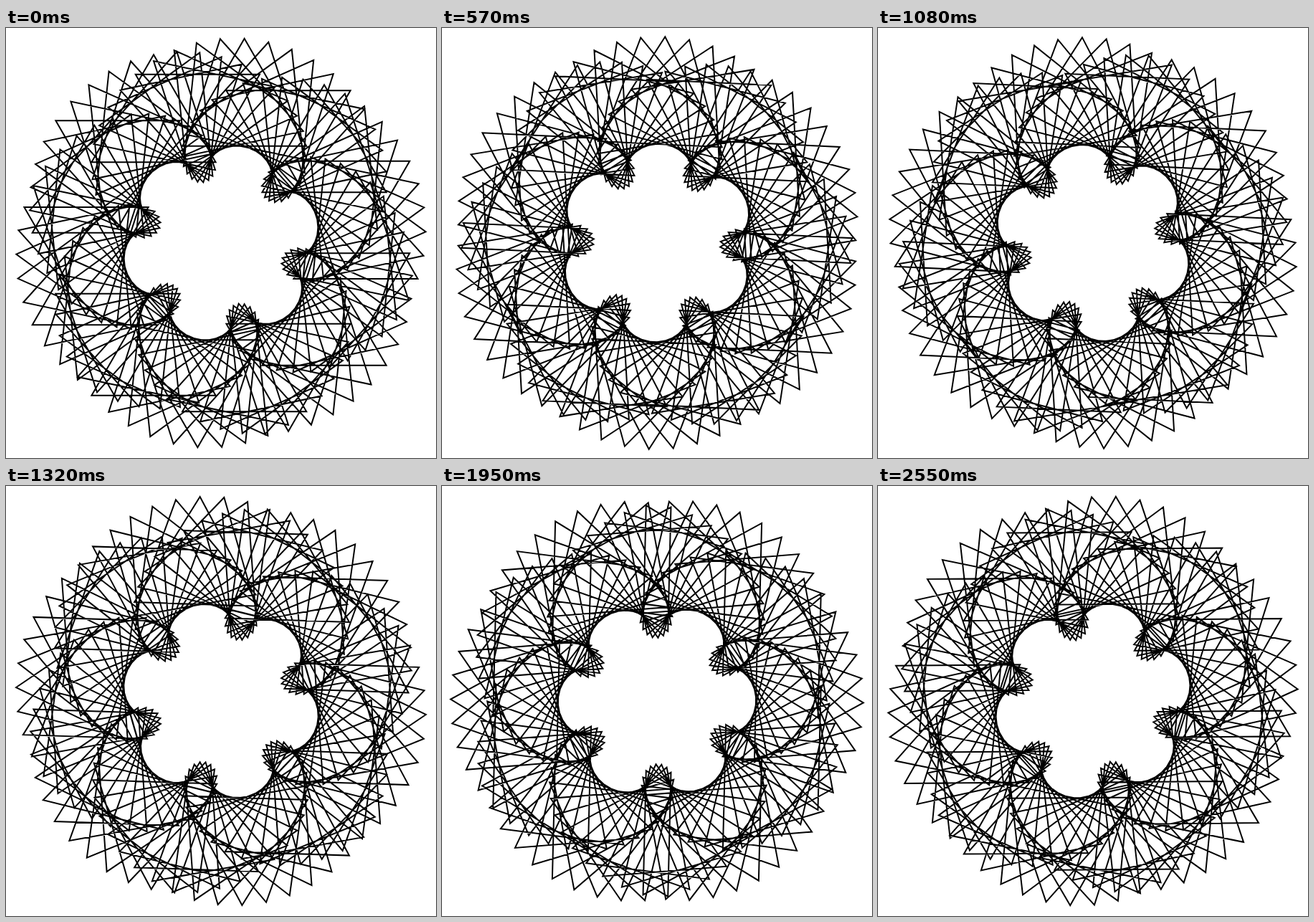
An HTML page that plays this animation: 600x600 px, repeating every 2.58 s.

```html
<!DOCTYPE html>
<html lang="en">
<head>
<meta charset="utf-8">
<title>Turning triangles</title>
<style>
  html, body { margin: 0; width: 100%; height: 100%; overflow: hidden; background: #fff; }
  svg { display: block; width: 100vw; height: 100vh; }
  path { fill: none; stroke: #000; stroke-width: 2; stroke-linejoin: miter; }
</style>
</head>
<body>
<svg viewBox="0 0 600 600"><path id="rosette"/></svg>
<script>
const COUNT = 90;             // triangles on the ring
const RING = 188;             // distance of their centres from the middle
const RADIUS = 100;           // centre to corner
const STEP = 30, LOOP = 2580; // ms
const START = Math.PI / 6;
const TURN = Math.PI / 128;   // rotation per step
const rosette = document.getElementById('rosette');

function corner(cx, cy, angle) {
  const x = cx + RADIUS * Math.cos(angle);
  const y = cy + RADIUS * Math.sin(angle);
  return x.toFixed(2) + ' ' + y.toFixed(2);
}

function triangle(theta, spin) {
  const cx = 300 + RING * Math.cos(theta);
  const cy = 300 + RING * Math.sin(theta);
  const points = [0, 1, 2].map(k => corner(cx, cy, 3 * theta + spin + k * 2 * Math.PI / 3));
  return 'M' + points.join('L') + 'Z';
}

function draw(ms) {
  const spin = START + TURN * Math.floor((ms % LOOP) / STEP);
  let d = '';
  for (let i = 0; i < COUNT; i++) d += triangle(2 * Math.PI * i / COUNT, spin);
  rosette.setAttribute('d', d);
}

let origin = null;
function tick(now) {
  if (origin === null) origin = now;
  draw(Math.max(0, now - origin));
  requestAnimationFrame(tick);
}
draw(0);
requestAnimationFrame(tick);
</script>
</body>
</html>
```
